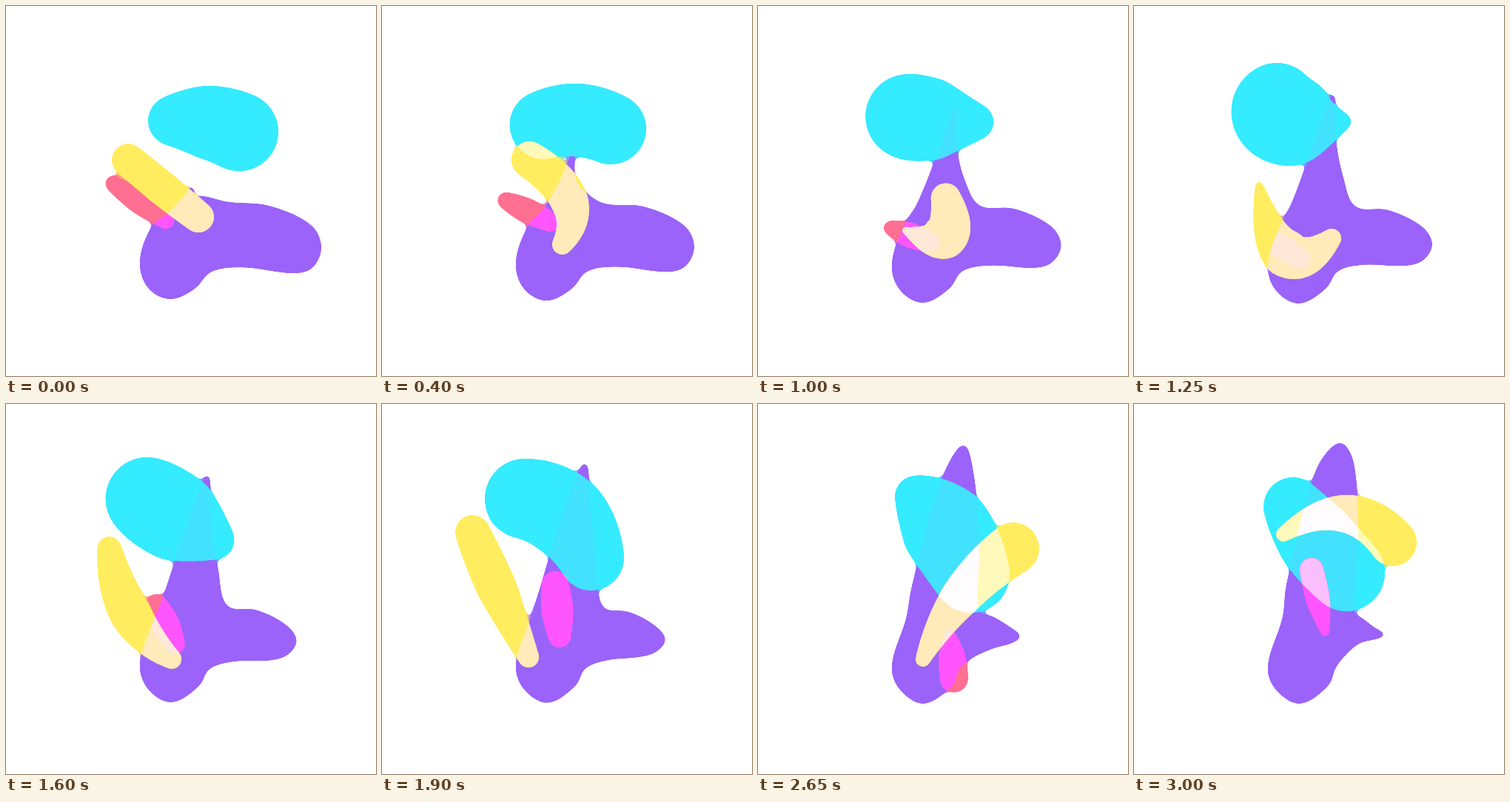
These frames come from a looping animation (500 by 500 pixels, 3050 ms). An HTML page with a canvas:

```html
<!DOCTYPE html>
<html lang="en">
<head>
<meta charset="utf-8">
<title>Blobs</title>
<style>
html, body { margin: 0; width: 100%; height: 100%; overflow: hidden; background: #fff; }
canvas { display: block; width: 500px; height: 500px; filter: url(#goo); }
svg { position: absolute; width: 0; height: 0; }
</style>
</head>
<body>
<canvas id="stage" width="500" height="500"></canvas>
<svg aria-hidden="true">
  <filter id="goo" x="0" y="0" width="100%" height="100%" color-interpolation-filters="sRGB">
    <feGaussianBlur in="SourceGraphic" stdDeviation="4" result="blur"/>
    <feColorMatrix in="blur" values="1 0 0 0 0  0 1 0 0 0  0 0 1 0 0  0 0 0 20 -9" result="goo"/>
    <feComposite in="SourceGraphic" in2="goo" operator="atop"/>
  </filter>
</svg>
<script>
const LOOP = 3050, STEP = 50, END = 3000;
const ctx = document.getElementById('stage').getContext('2d');

const even = u => u;
const rise = u => 1 - (1 - u) ** 2;
const sink = u => u ** 1.5;

// Purple: outline knots, clockwise from the top: x, y at the start, x, y at the end, easing.
const knots = [
  [253, 243, 278, 52, rise],
  [256, 256, 297, 80, even],
  [268, 257, 303, 195, even],
  [300, 265, 298, 280, even],
  [355, 270, 312, 292, sink],
  [412, 296, 326, 303, sink],
  [426, 325, 341, 312, sink],
  [415, 353, 325, 318, sink],
  [390, 361, 305, 323, sink],
  [320, 353, 285, 340, sink],
  [277, 359, 272, 357, even],
  [255, 382, 263, 380, rise],
  [222, 396, 224, 405, rise],
  [192, 381, 191, 385, rise],
  [181, 345, 181, 354, even],
  [197, 298, 201, 288, even],
  [219, 280, 206, 245, even],
  [240, 257, 245, 92, even]
];

// The others are bent limbs: time, then x, y, radius for head, middle and tail.
// Without a middle the limb is straight.
const limbs = {
  cyan: [
    [0, 226, 155, 34, 273, 157, 49, 315, 170, 53],
    [800, 210, 161, 56, 250, 152, 51, 302, 162, 39],
    [1250, 193, 132, 55, 210, 154, 62, 284, 156, 10],
    [1900, 193, 128, 54, 248, 152, 57, 283, 208, 44],
    [2650, 213, 125, 28, 255, 170, 60, 288, 230, 52],
    [3000, 215, 139, 40, 248, 185, 53, 287, 228, 52]
  ],
  yellow: [
    [0, 165, 208, 22, 212, 247, 23, 260, 285, 21],
    [800, 233, 221, 25, 277, 285, 28, 222, 339, 7],
    [1250, 267, 314, 13, 205, 334, 32, 169, 241, 5],
    [1900, 198, 342, 14, 155, 248, 27, 122, 173, 23],
    [2250, 293, 235, 9, 212, 339, 42, 129, 204, 5],
    [2650, 345, 195, 35, 274, 261, 27, 223, 345, 10],
    [3000, 350, 187, 32, 283, 148, 25, 202, 176, 10]
  ],
  pink: [
    [0, 145, 240, 11, 216, 290, 11],
    [800, 184, 285, 11, 236, 300, 14],
    [1250, 174, 308, 9, 225, 342, 13],
    [1900, 234, 244, 18, 240, 314, 15],
    [2250, 266, 285, 6, 290, 380, 20],
    [2650, 259, 309, 6, 265, 371, 19],
    [3000, 240, 224, 16, 258, 307, 6]
  ]
};

// Fill colour for each overlap, painted in order.
const layers = [
  ['purple', '#9b63fa'],
  ['cyan', '#35ebff'],
  ['cyan purple', '#42e2ff'],
  ['pink', '#ff6f91'],
  ['pink purple', '#ff55ff'],
  ['pink cyan', '#fabffc'],
  ['yellow', '#ffed5f'],
  ['yellow purple', '#ffeab9'],
  ['yellow purple pink', '#ffe8d8'],
  ['yellow cyan', '#fffabb'],
  ['yellow cyan purple', '#fffcff']
].map(([names, color]) => [names.split(' '), color]);

// Smooth interpolation through the poses.
function poseAt(poses, t) {
  const last = poses.length - 1;
  let i = 0;
  while (i < last - 1 && t >= poses[i + 1][0]) i++;
  const p = poses[i], q = poses[i + 1];
  const before = poses[Math.max(i - 1, 0)], after = poses[Math.min(i + 2, last)];
  const span = q[0] - p[0], u = (t - p[0]) / span;
  return p.map((v, k) => {
    const w = q[k];
    const m = (w - before[k]) / (q[0] - before[0]) * span;
    const n = (after[k] - v) / (after[0] - p[0]) * span;
    const c = 3 * (w - v) - 2 * m - n;
    const d = m + n - 2 * (w - v);
    return v + u * (m + u * (c + u * d));
  }).slice(1);
}

// Discs strung along a parabola through head, middle and tail.
function limb(pose) {
  const a = pose.slice(0, 3), b = pose.slice(-3);
  const mid = pose.length > 6 ? pose.slice(3, 6)
    : a.map((v, k) => (v + b[k]) / 2 + (k === 2 ? 5 : 0));
  const path = new Path2D();
  for (let i = 0; i <= 100; i++) {
    const s = i / 100;
    const [x, y, curved] = a.map((v, k) =>
      v * (1 - s) * (1 - 2 * s) + mid[k] * 4 * s * (1 - s) + b[k] * s * (2 * s - 1));
    const end = s < 0.5 ? a : b, near = Math.abs(1 - 2 * s);
    const straight = mid[2] + (end[2] - mid[2]) * near;
    const r = Math.max((curved + straight) / 2, 1);
    path.moveTo(x + r, y);
    path.arc(x, y, r, 0, 2 * Math.PI);
  }
  return path;
}

// Closed curve with tangents scaled by chord length.
function outline(points) {
  const n = points.length;
  const at = i => points[(i + n) % n];
  const gap = (a, b) => Math.hypot(b[0] - a[0], b[1] - a[1]);
  const tangent = i => {
    const a = at(i - 1), b = at(i), c = at(i + 1);
    const len = gap(a, b) + gap(b, c);
    return [(c[0] - a[0]) / len, (c[1] - a[1]) / len];
  };
  const path = new Path2D();
  path.moveTo(...at(0));
  for (let i = 0; i < n; i++) {
    const p = at(i), q = at(i + 1), s = tangent(i), e = tangent(i + 1);
    const h = gap(p, q) * 0.36;
    path.bezierCurveTo(p[0] + s[0] * h, p[1] + s[1] * h,
                       q[0] - e[0] * h, q[1] - e[1] * h, q[0], q[1]);
  }
  path.closePath();
  return path;
}

function draw(t) {
  const paths = {
    purple: outline(knots.map(([x0, y0, x1, y1, ease]) => {
      const e = ease(t / END);
      return [x0 + (x1 - x0) * e, y0 + (y1 - y0) * e];
    }))
  };
  for (const name in limbs) paths[name] = limb(poseAt(limbs[name], t));

  ctx.clearRect(0, 0, 500, 500);
  for (const [[top, ...under], color] of layers) {
    ctx.save();
    for (const name of under) ctx.clip(paths[name]);
    ctx.fillStyle = color;
    ctx.fill(paths[top]);
    ctx.restore();
  }
}

const start = performance.now();
function tick() {
  const t = (performance.now() - start) % LOOP;
  draw(Math.floor(t / STEP) * STEP);
  requestAnimationFrame(tick);
}
tick();
</script>
</body>
</html>
```
